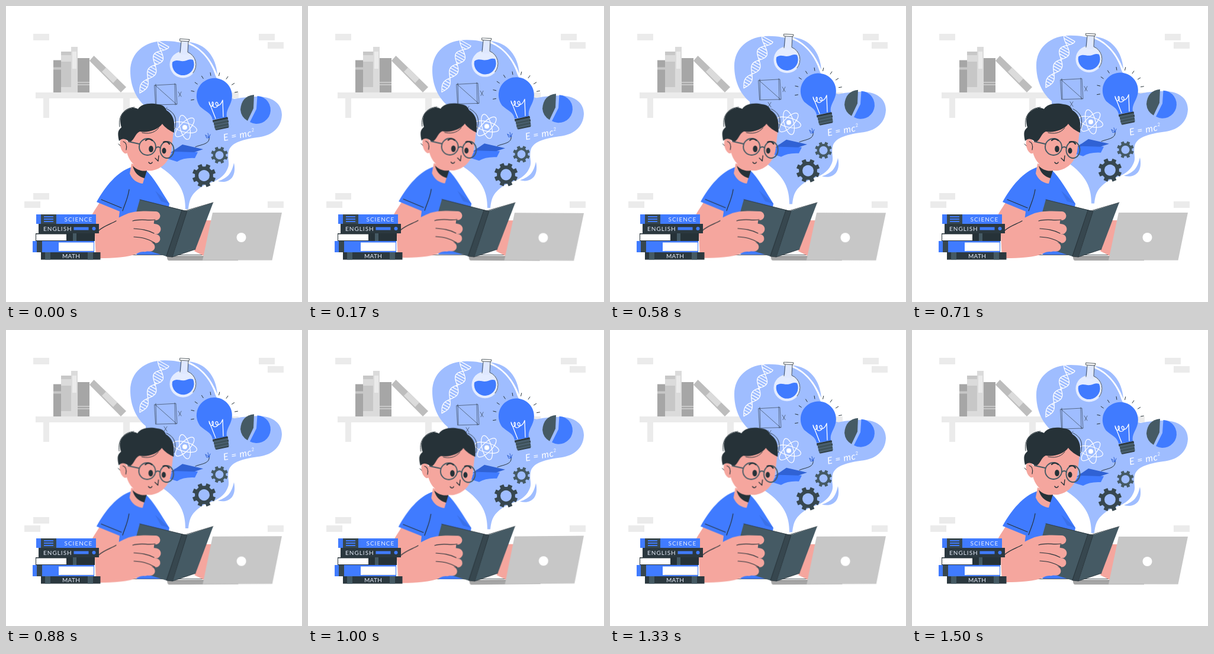
An HTML page that plays this animation: 500 by 500 pixels, repeating every 1.54 s.

```html
<!DOCTYPE html>
<html lang="en">
<head>
<meta charset="utf-8">
<title>Studying</title>
<style>
html, body { margin: 0; width: 100%; height: 100%; overflow: hidden; background: #fff; }
svg { display: block; width: 100vw; height: 100vh; }
text { font-family: Lato, sans-serif; }
.title { font-size: 10px; letter-spacing: 1px; fill: #e8eefc; }
.blue { fill: #407bff; }
.pale { fill: #9fbdff; }
.dark { fill: #263238; }
.cover { fill: #2b383f; }
.slate { fill: #455a64; }
.skin { fill: #f5a69e; }
.g1 { fill: #ebebeb; }
.g2 { fill: #dbdbdb; }
.g3 { fill: #c7c7c7; }
.g4 { fill: #a6a6a6; }
.white { fill: #fff; }
.ink, .chalk, .finger { fill: none; stroke: #263238; stroke-linecap: round; stroke-linejoin: round; }
.chalk { stroke: #fff; }
.finger { stroke: #f5a69e; }
#idea { animation: bob 1540ms cubic-bezier(.38, .15, .62, .85) infinite; }
#reader { transform-origin: 310px 357px; animation: sway 1540ms ease-in-out infinite; }
@keyframes bob {
  0%, 97%, 100% { transform: translateY(0); }
  46% { transform: translateY(-9.3px); }
}
@keyframes sway {
  0%, 46%, 100% { transform: rotate(0); }
  21% { transform: rotate(.6deg); }
  70% { transform: rotate(-.6deg); }
}
</style>
</head>
<body>
<svg viewBox="0 0 500 500">
  <g id="wall">
    <path class="g1" d="M46 47h27v11h-27zM427 47h27v11h-27zM442 61h27v11h-27zM46 316h27v11h-27zM31 330h27v11h-27zM442 330h27v11h-27z"/>
    <path class="g1" d="M50 146H393v10H50zM63 156h10v33h-10zM198 156h11v33h-11z"/>
    <path class="g4" d="M80 91.500h14V146H80z"/>
    <path class="g3" d="M80 103.500h14v4H80z"/>
    <path class="g3" d="M93 77h17v69H93z"/>
    <path class="g2" d="M93 83h17v11H93zM93 137h17v9H93z"/>
    <path class="g2" d="M110 69h11v77h-11z"/>
    <path class="g1" d="M112 77h7v29h-7z"/>
    <path class="g4" d="M121 88h20v58h-20z"/>
    <path class="g3" d="M121 128h20v2h-20zM121 132h20v2h-20z"/>
    <path fill="#bdbdbd" d="M148.500 84 203 137 194 146 141 92.500z"/>
    <path class="g2" d="M169 104 188 122.500 181 130 162 111z"/>
  </g>

  <g id="idea">
    <path class="pale" d="M303 343C303 318 296 296 262 273L236 240V170C219 156 210 134 210 110C210 79 234 59 268 59C284 59 297 62 309 65C329 73 346 92 354 118C361 130 366 154 386 157C402 154 413 153 428 153C452 154 466 166 466 184C465 208 446 220 424 222C396 226 379 232 376 246C373 262 381 266 371 281C359 298 343 297 328 307C313 318 310 326 308 343z"/>
    <path class="pale" d="M308 61C337 63 355 86 357 116C347 90 332 72 308 61z"/>
    <path class="pale" d="M385 265C390 288 378 301 358 296C376 290 381 282 385 265z"/>

    <path id="dna" class="chalk" stroke-width="1.300"/>

    <circle cx="299" cy="99" r="22.500" fill="#e4ecff"/>
    <path d="M296 60h12l-1 22h-12z" fill="#dfe8ff"/>
    <path class="blue" d="M281 95C288 89 293 94 301 93C307 92 310 89 316 91A18.500 18.500 0 1 1 281 95z"/>
    <path class="ink" stroke-width=".8" d="M294 55.500 310 56.500 309 60 294 59zM296 60 294 79M308 60 307 78A22.500 22.500 0 0 1 316 113"/>

    <path class="ink" stroke-width=".6" d="M251 134 287 132 289 166 253 167zM253 132 254 166M285 131 286 167M252 134 288 166M291 145 296 153M296 145 292 153M267 171 272 179M272 171 267 179"/>

    <g class="chalk" stroke-width="1.200" transform="translate(302 205)">
      <ellipse rx="21" ry="8" transform="rotate(15)"/>
      <ellipse rx="21" ry="8" transform="rotate(75)"/>
      <ellipse rx="21" ry="8" transform="rotate(135)"/>
      <circle r="4" fill="#fff" stroke="none"/>
    </g>

    <path id="rays" class="ink" stroke-width="1" transform="translate(352 152)"/>
    <path class="blue" d="M349 192C347 181 338 179 328 170A30 30 0 1 1 381 159C378 171 371 176 373 188z"/>
    <path class="chalk" stroke-width="1.300" d="M354 190 343 162C344 173 353 170 350 163C347 158 347 174 355 171C361 168 357 159 354 164C354 171 362 170 366 159L367 187"/>
    <g transform="translate(363.500 199) rotate(-12)">
      <path class="dark" d="M-13-9h26v4h-26zM-12-4h25v4h-25zM-12 1h24v4h-24zM-11 6h22v3h-22z"/>
      <path class="slate" d="M-12-7h24V8h-24z" opacity=".8"/>
    </g>

    <path class="slate" d="M419 150 418 173 408 194A24 24 0 0 1 396 175C397 160 405 151 419 150z"/>
    <path class="blue" d="M424.500 152A23.500 23.500 0 1 1 412 196L423 174z"/>

    <text transform="translate(368 228) rotate(-10)" class="white" font-size="16" font-style="italic" letter-spacing=".6">E = mc<tspan font-size="8" dy="-7">2</tspan></text>

    <path class="blue" d="M285 242 324 247 319 257Q300 256 289 263L273 258z"/>
    <path d="M276 249 298 234 333 242 318 247 287 246z" fill="#3062d4"/>
    <path class="ink" stroke-width="1" d="M320 238C328 234 345 234 343 222"/>
    <path class="ink" stroke-width="1" style="stroke:#3062d4" d="M343 222 337 218M343 222 341 215M343 222 345 217M337 218 339 223 344 222"/>

    <path id="bigGear" fill="#37474f" fill-rule="evenodd" transform="translate(334.500 286.500) rotate(22.500)"/>
    <path id="smallGear" class="slate" fill-rule="evenodd" transform="translate(360.500 252) rotate(22.500)"/>
  </g>

  <path class="ink" stroke-width=".8" d="M156 420.500H450"/>

  <g id="reader">
    <path class="skin" d="M158 332 196 345 182 378 148 388L143 358C146 349 153 341 158 332z"/>
    <path class="blue" d="M212 272C188 280 168 304 153 331L192 347 185 400 222 420H262L276 334C262 312 250 290 236 277z"/>
    <path class="skin" d="M212 266 209 283C213 293 221 299 231 300L238 276z"/>
    <path d="M252 312 276 334 262 330z" fill="#3a70e8"/>
    <path class="dark" d="M214 270C221 277 230 280 238 278L234 291C224 288 217 282 214 270z"/>
    <path class="ink" stroke-width="1.200" d="M161 327 195 341M208 310C206 325 200 336 197 346"/>

    <path class="skin" d="M207 210 204 246C208 267 227 280 247 278C262 275 274 265 279 246L283 212 262 192 225 203z"/>
    <ellipse class="skin" cx="200" cy="236" rx="7" ry="13.500" transform="rotate(-14 200 236)"/>
    <path class="ink" stroke-width="1.200" d="M198 229C205 231 204 238 203 243"/>
    <path class="dark" d="M191 228C188 215 189 210 195 205C190 190 195 179 207 174C214 171 219 172 223 174C228 165 244 163 256 166C266 167 269 171 271 176C281 182 285 193 284 203L284 214C277 211 268 205 264 199C257 209 239 215 226 212C217 216 218 226 209 230C204 226 198 221 191 228z"/>
    <path class="ink" stroke-width="1" d="M192 204C189 185 200 172 217 171M272 174C286 181 289 191 285 207M258 206C250 216 238 216 230 214M190 233 193 236"/>

    <g class="ink" style="stroke:#455a64" stroke-width="1.900">
      <circle cx="239" cy="238" r="14"/>
      <ellipse cx="272" cy="243" rx="11.500" ry="14"/>
      <path d="M225 233 207 229M253 240Q257 236 261 240"/>
    </g>
    <ellipse class="dark" cx="245" cy="241.500" rx="3.800" ry="5.500"/>
    <ellipse class="dark" cx="267" cy="244.500" rx="3.500" ry="5"/>
    <path class="ink" stroke-width="2.300" d="M236 227C239 224 243 224 247 227M266 230C270 228 274 230 276 233"/>
    <path class="ink" stroke-width="1.400" d="M252 257 257 262 258 253M241 264C243 267 246 267 247 264"/>

    <path class="skin" d="M337 362H350L334 422 318 414z"/>
    <path class="g4" d="M272 422.500H392V430H275Q272 430 272 422.500z"/>
    <path d="M272 422.500H392V424H272z" fill="#8f8f8f"/>
    <path class="g3" d="M349 349H466L449.500 429.500H332z"/>
    <circle class="white" cx="397.500" cy="391" r="8"/>

    <path class="slate" d="M226 327 304 346 271 423 205 402z"/>
    <path class="slate" d="M305 346 350 332 320 411 281 424z"/>
    <path fill="#37474f" d="M297 345 306 346 281 424 270 422.500z"/>
    <path class="ink" stroke-width=".8" d="M226 327 302 346 350 332M297 345 271 423 281 424 306 346M281 424 320 411"/>

    <path class="skin" d="M150 386C164 371 187 358 207 350C219 346 236 346 252 347L246 400C248 412 238 416 232 415C226 415 222 418 217 420C198 426 170 426 152 426z"/>
    <path class="finger" stroke-width="15" d="M212 357 253 354.500M240 407 244 407"/>
    <path class="finger" stroke-width="17" d="M216 371 253 377"/>
    <path class="finger" stroke-width="15" d="M216 386 253 393"/>
    <path class="ink" stroke-width="1.200" d="M214 363C228 359 238 363 252 361M216 376C228 377 239 378 250 384M216 390C230 391 240 393 251 400M157 379C166 371 178 368 186 363"/>
  </g>

  <g id="stack">
    <path class="blue" d="M51 352H152V368H51z"/>
    <path fill="#37474f" d="M59 352h26v16h-26z"/>
    <path class="blue" d="M64 355h16v2h-16zM64 359h16v2h-16zM64 363h16v2h-16z"/>
    <text class="title" x="98.500" y="363.700">SCIENCE</text>
    <path class="cover" d="M55 368H157V384H55z"/>
    <text class="title" x="63" y="379.500">ENGLISH</text>
    <path class="blue" d="M114.500 373.500h25v5h-25z"/>
    <circle class="blue" cx="148.500" cy="376" r="3"/>
    <path class="dark" d="M50 384H150V397H50z"/>
    <path class="white" d="M51 385.500H102V396H51z"/>
    <path class="slate" d="M113 384h6v13h-6z"/>
    <path class="blue" d="M45 397H149V416H45z"/>
    <path fill="#37474f" d="M52 397h9v19h-9z"/>
    <path class="white" d="M89 399.500H148V414H89z"/>
    <path class="g2" d="M92 413H148V414H92z"/>
    <path class="cover" d="M59 416H159.500V428.500H59z"/>
    <path class="slate" d="M66 416h9v12.500h-9zM138 416h9v12.500h-9z"/>
    <text class="title" x="95" y="426" style="letter-spacing:.3px">MATH</text>
  </g>
</svg>
<script>
const put = (id, d) => document.getElementById(id).setAttribute('d', d);
const polar = (r, a) => `${(r * Math.cos(a)).toFixed(1)} ${(r * Math.sin(a)).toFixed(1)}`;

function gear(outer, inner, hole, teeth) {
  const step = 2 * Math.PI / teeth, pts = [];
  for (let i = 0; i < teeth; i++) {
    const a = i * step;
    pts.push(polar(inner, a - step * .3), polar(outer, a - step * .23),
             polar(outer, a + step * .23), polar(inner, a + step * .3));
  }
  return `M${pts.join('L')}zM${hole} 0A${hole} ${hole} 0 1 0 ${-hole} 0A${hole} ${hole} 0 1 0 ${hole} 0z`;
}

// Two strands twisting about a bent axis, wider towards the top
function helix() {
  const at = (u, side) => {
    const w = side * (5 + 5.5 * u) * Math.sin(u * Math.PI * 3.5);
    const x = 226 + 40 * u + 3 * Math.sin(u * Math.PI), y = 147 - 83 * u;
    return `${(x + w * .87).toFixed(1)} ${(y + w * .49).toFixed(1)}`;
  };
  const strand = side => 'M' + Array.from({ length: 61 }, (_, i) => at(i / 60, side)).join('L');
  let rungs = '';
  for (let i = 0; i <= 20; i++) rungs += `M${at(i / 20, 1)}L${at(i / 20, -1)}`;
  return strand(1) + strand(-1) + rungs;
}

function rays() {
  let d = '';
  for (let deg = 170; deg <= 372; deg += 22.5) {
    const a = deg * Math.PI / 180;
    d += `M${polar(35, a)}L${polar(40, a)}`;
  }
  return d;
}

put('dna', helix());
put('rays', rays());
put('bigGear', gear(20, 15.5, 9.5, 8));
put('smallGear', gear(14.5, 11, 7, 8));
</script>
</body>
</html>
```
